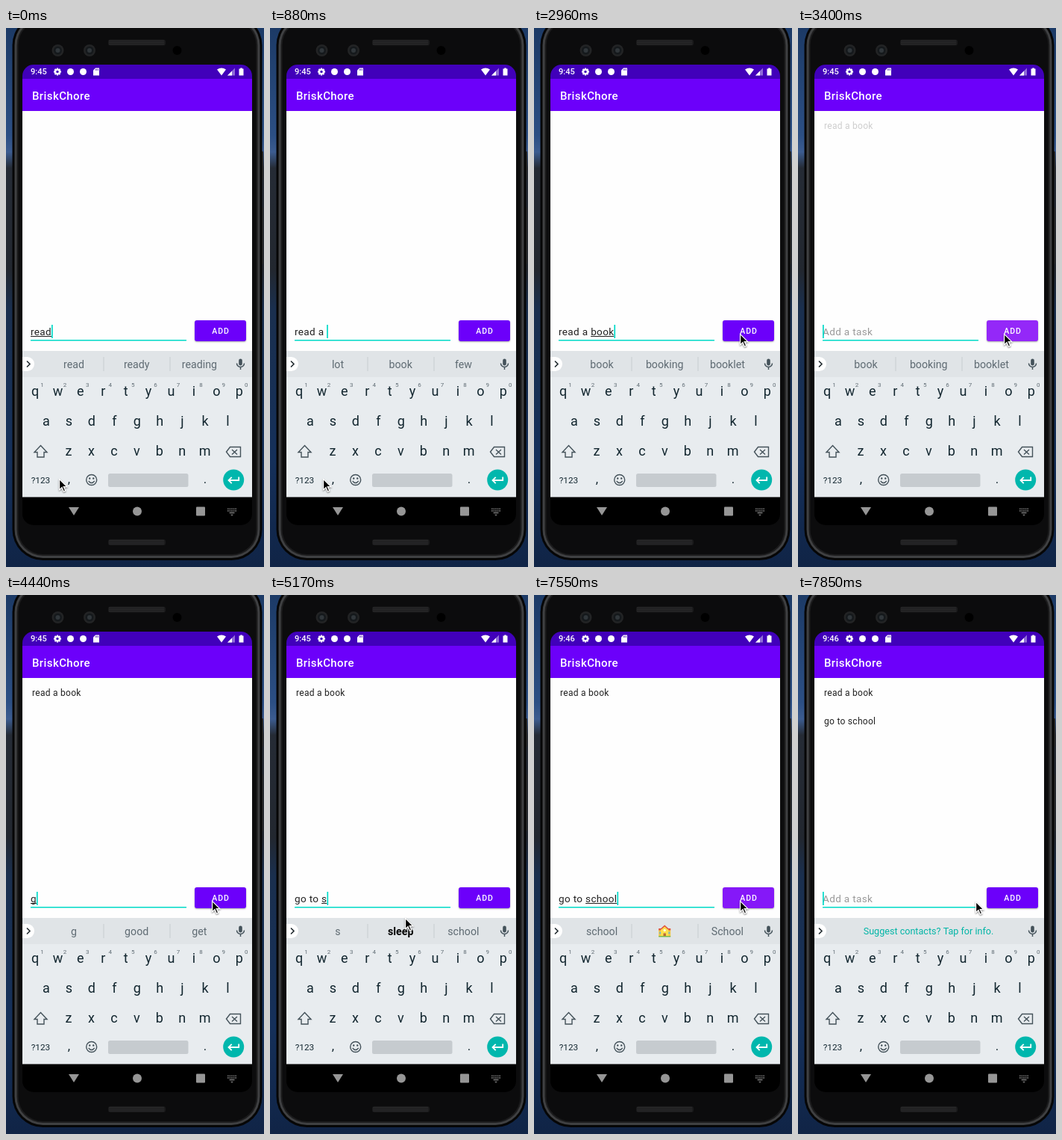
An HTML page with a canvas for the animation above (8000 ms loop, 346x721 px).

```html
<!DOCTYPE html>
<html lang="en">
<head>
<meta charset="utf-8">
<title>To-do list demo</title>
<style>
  html, body { margin: 0; width: 100%; height: 100%; overflow: hidden; background: #000; }
  canvas { display: block; }
</style>
</head>
<body>
<canvas id="stage" width="346" height="721"></canvas>
<script>
const ctx = document.getElementById('stage').getContext('2d');
const LOOP = 8000;
const TEAL = '#00dac8', INK = '#12262f', GREY = '#5f6b73', ICON = '#44525a';
const NOTICE = ['Suggest contacts? Tap for info.'];

// [time, text with | before the word being composed, suggestions]
const typing = [
  [0, '|read', ['read', 'ready', 'reading']],
  [440, 'read ', ['read', 'ready', 'reading']],
  [590, 'read ', ['the', 'a', 'it']],
  [740, 'read |a', ['a', 'as', 'and']],
  [880, 'read a ', ['lot', 'book', 'few']],
  [1180, 'read a |b', ['b', 'book', 'bit']],
  [1480, 'read a |bo', ['bo', 'book', 'box']],
  [1630, 'read a |book', ['book', 'books', 'booked']],
  [1780, 'read a |book', ['book', 'booking', 'booklet']],
  [3400, '', ['book', 'booking', 'booklet']],
  [3690, '', NOTICE],
  [4440, '|g', ['g', 'good', 'get']],
  [4590, '|go', ['go', 'good', 'going']],
  [4730, 'go |t', ['t', 'to', 'the']],
  [4880, 'go |to', ['to', 'too', 'today']],
  [5030, 'go to ', ['the', 'bed', 'sleep']],
  [5170, 'go to |s', ['s', '*sleep', 'school']],
  [5460, 'go to |sc', ['sc', '*school', 'score']],
  [5610, 'go to |sch', ['sch', '*school', 'schedule']],
  [6210, 'go to |scho', ['scho', '*school', 'schools']],
  [6360, 'go to |schoo', ['schoo', '*school', 'School']],
  [6650, 'go to |school', ['school', '#', 'School']],
  [7700, '', ['school', '#', 'School']],
  [7850, '', NOTICE]
];
const pointer = [
  [0, 71, 603], [2070, 143, 582], [2220, 207, 543], [2370, 246, 468], [2510, 270, 425],
  [2660, 276, 409], [5030, 230, 424], [5170, 181, 432], [6950, 238, 418],
  [7100, 276, 409], [7850, 238, 410]
];
const button = [
  [0, '#6c00fa'], [3250, '#8518f8'], [3400, '#9428f8'], [3550, '#7d12f9'],
  [3690, '#6c00fa'], [7550, '#8518f8'], [7700, '#9428f8'], [7850, '#6c00fa']
];
const caret = [[0, true], [2070, false], [2660, true], [7100, false], [7550, true]];
const tasks = [
  ['read a book', 135, [[0, 0], [3400, .22], [3550, 1]]],
  ['go to school', 173, [[0, 0], [7700, .22], [7850, 1]]]
];

const at = (steps, t) => steps.findLast(s => s[0] <= t);

function text(str, x, y, size, color, { weight = 400, align = 'center', spacing = 0 } = {}) {
  ctx.font = `${weight} ${size}px Roboto, sans-serif`;
  ctx.letterSpacing = spacing + 'px';
  ctx.textAlign = align;
  ctx.fillStyle = color;
  ctx.fillText(str, x, y);
  return ctx.measureText(str).width;
}
function rect(x, y, w, h, color, r = 0) {
  ctx.fillStyle = color;
  ctx.beginPath();
  ctx.roundRect(x, y, w, h, r);
  ctx.fill();
}
function disc(x, y, r, color) {
  ctx.fillStyle = color;
  ctx.beginPath();
  ctx.arc(x, y, r, 0, 7);
  ctx.fill();
}
function shape(d, x, y, fill, stroke, width = 1.4) {
  const path = new Path2D(d);
  ctx.save();
  ctx.translate(x, y);
  if (fill) { ctx.fillStyle = fill; ctx.fill(path); }
  if (stroke) { ctx.strokeStyle = stroke; ctx.lineWidth = width; ctx.stroke(path); }
  ctx.restore();
}

function drawPhone() {
  // Sky, dark cliffs, sea
  const desk = ctx.createLinearGradient(0, 0, 0, 721);
  [[0, '#1c3a66'], [.2, '#2c4f84'], [.23, '#3c5c90'], [.26, '#252b35'], [.45, '#22272f'],
   [.52, '#1a2f4e'], [.8, '#15305a'], [1, '#102446']].forEach(s => desk.addColorStop(...s));
  rect(0, 0, 346, 721, desk);
  rect(342, 165, 3, 38, '#2a2a2b', 1);
  rect(342, 240, 3, 76, '#2a2a2b', 1);
  // Nested outlines: rim, metal band, bezel
  [[0, '#060606'], [3, '#3f4042'], [6, '#1c1c1d'], [8, '#0c0c0d']].forEach(([inset, color]) =>
    rect(8.5 + inset, inset - 18, 335 - 2 * inset, 730 - 2 * inset, color, 41 - inset));
  for (const y of [15.5, 684]) {
    rect(137, y, 77, 8, '#1b1b1c', 3);
    for (let i = 0; i < 37; i++)
      for (let j = 0; j < 3; j++) rect(138.5 + i * 2, y + 1 + j * 2.3, 1, 1.2, '#3a3a3b');
  }
  for (const x of [69.5, 112]) {
    disc(x, 30, 8, '#232425');
    disc(x, 30, 5.5, '#15191c');
    disc(x, 30, 3, '#30363a');
  }
  disc(229.5, 30, 6, '#000');
}

function drawStatus(t) {
  rect(22, 49, 308, 20, '#4100ba', [15, 15, 0, 0]);
  text(t < 6950 ? '9:45' : '9:46', 33, 62, 11, '#fff', { weight: 500, align: 'left' });
  for (let i = 0; i < 4; i++) {
    ctx.save();
    ctx.translate(69, 58.5);
    ctx.rotate(i * Math.PI / 4);
    rect(-1.2, -5, 2.4, 10, '#fff', .5);
    ctx.restore();
  }
  disc(69, 58.5, 3.7, '#fff');
  disc(69, 58.5, 1.7, '#4100ba');
  disc(86.5, 58.5, 4.5, '#fff');
  disc(103.5, 58.5, 4.5, '#fff');
  shape('M-1-5H4V5H-4V-2Z', 121, 58.5, '#fff');
  for (const x of [-.8, .8, 2.4]) rect(120.6 + x, 54.7, .8, 2, '#4100ba');
  shape('M0 5L-6-3Q0-7 6-3Z', 289, 58.5, '#fff');
  shape('M-5 5L5-5V5Z', 302, 58.5, '#8f6bd8');
  shape('M-5 5L1-1V5Z', 302, 58.5, '#fff');
  shape('M-1.3-5H1.3V-4H3V5H-3V-4H-1.3Z', 315.5, 58.5, '#fff');
}

function drawApp(t) {
  rect(22, 68, 308, 43, '#6c00fa');
  text('BriskChore', 35, 96, 15, '#fff', { weight: 500, align: 'left', spacing: .4 });
  rect(22, 111, 308, 321, '#fefefe');
  for (const [name, y, fade] of tasks) {
    ctx.globalAlpha = at(fade, t)[1];
    text(name, 35, y, 12, '#202020', { align: 'left', spacing: .28 });
  }
  ctx.globalAlpha = 1;

  const style = { align: 'left', spacing: .36 };
  const [before, word = ''] = at(typing, t)[1].split('|');
  const start = 33 + text(before, 33, 411, 13.5, '#202020', style);
  const end = start + text(word, start, 411, 13.5, '#202020', style);
  if (word) rect(start, 412, end - start, 1, '#202020');
  if (!before && !word) text('Add a task', 33, 411, 13.5, '#999', style);
  rect(33, 417, 209, 1.5, TEAL);
  if (at(caret, t)[1]) rect(end, 397, 1.7, 18, TEAL);

  ctx.save();
  ctx.shadowColor = '#0005';
  ctx.shadowBlur = 2;
  ctx.shadowOffsetY = 1;
  rect(253, 391, 69, 28, at(button, t)[1], 3);
  ctx.restore();
  text('ADD', 288, 409, 10.5, '#fff', { weight: 500, spacing: .94 });
}

function drawSchool(x, y) {
  rect(x - 8, y - 3, 16, 10, '#f5c944');
  rect(x - 8, y - 4, 16, 2.5, '#e0523f');
  shape('M-5-3L0-8L5-3V7H-5Z', x, y, '#fbe04f');
  shape('M-5-3L0-7.5L5-3', x, y, null, '#e0523f', 1.6);
  disc(x, y - 1.5, 1.6, '#fff');
  rect(x - 1.7, y + 2.5, 3.4, 4.5, '#b9683a');
  for (const dx of [-7, 5.2]) rect(x + dx, y + .5, 1.8, 3, '#6fb7d8');
  rect(x - 8, y + 6, 16, 1.5, '#79b84a');
}

function drawSuggestions(t) {
  rect(22, 432, 308, 35, '#e0e4e7');
  rect(22, 440, 16, 19, '#fff', [0, 9.5, 9.5, 0]);
  shape('M-2-4L2 0L-2 4', 30, 449.5, null, '#20292e', 1.6);
  const words = at(typing, t)[2];
  if (words.length === 1) {
    text(words[0], 175, 454, 12.6, '#00b5a6');
  } else {
    for (const x of [131, 220]) rect(x - .5, 440, 1, 19, '#c6ccd0');
    words.forEach((word, i) => {
      const x = 91 + i * 84.2;
      if (word === '#') drawSchool(x, 450);
      else if (word[0] === '*') text(word.slice(1), x, 455, 14.2, '#000', { weight: 700 });
      else text(word, x, 455, 14.2, GREY);
    });
  }
  rect(312.2, 442.5, 4.6, 9, ICON, 2.3);
  shape('M-5-1A5 5 0 0 0 5-1M0 4V7.5', 314.5, 449.5, null, ICON, 1.5);
}

function drawKeyboard() {
  rect(22, 467, 308, 161, '#e8ecef');
  ['qwertyuiop', 'asdfghjkl', 'zxcvbnm'].forEach((row, r) => {
    [...row].forEach((key, i) => {
      const x = [39, 54, 84][r] + i * 30.42;
      text(key, x, 492.4 + r * 39.7, 18, INK);
      if (!r) text((i + 1) % 10, x + 9.5, 480, 8, GREY);
    });
  });
  shape('M0-8L8.5 1H4.5V7.5H-4.5V1H-8.5Z', 46.5, 566.5, null, ICON);
  shape('M-9.5 0L-4.5-6.5H9.5V6.5H-4.5ZM-2-3L5 3.5M5-3L-2 3.5', 305, 567, null, ICON);
  text('?123', 46.5, 609, 11.8, INK);
  text(',', 84.5, 609, 17, INK);
  text('.', 267, 609, 17, INK);
  shape('M7 0A7 7 0 1 1-7 0A7 7 0 1 1 7 0M-4 1.5Q0 6.5 4 1.5', 114.7, 604.5, null, ICON);
  for (const dx of [-2.5, 2.5]) disc(114.7 + dx, 602.5, 1.2, ICON);
  rect(137, 596, 107.5, 18, '#c6cbcf', 2.5);
  disc(305.2, 604.5, 14, '#00b7ad');
  shape('M7-4.5V0H-6.5M-2.5-4.2L-6.7 0L-2.5 4.2', 305.2, 605, null, '#fff', 1.8);

  rect(22, 627.5, 308, 37.5, '#000', [0, 0, 15, 15]);
  shape('M-7-5H7L0 6Z', 91, 646, '#969696');
  disc(176, 646.5, 6, '#969696');
  rect(255, 640.5, 12, 12, '#969696', 1);
  for (let i = 0; i < 5; i++)
    for (let j = 0; j < 2; j++) rect(297 + i * 2.6, 642.5 + j * 2.6, 1.6, 1.6, '#777');
  rect(299.6, 647.7, 6.9, 1.6, '#777');
  shape('M-2 0H2L0 2Z', 303, 650.7, '#777');
}

function drawPointer(t) {
  const [, x, y] = at(pointer, t);
  ctx.save();
  ctx.shadowColor = '#0006';
  ctx.shadowBlur = 2;
  ctx.shadowOffsetY = 1;
  shape('M.5.5V15L3.9 11.9L6.3 17.3L8.9 16.2L6.5 10.9H11Z', x, y, '#fff', '#fff', 1.2);
  ctx.restore();
  shape('M1.2 2V13.2L4.2 10.5L6.7 16.2L7.8 15.7L5.3 10H9.2Z', x, y, '#000');
}

function frame(now) {
  const t = now % LOOP;
  drawPhone();
  drawStatus(t);
  drawApp(t);
  drawSuggestions(t);
  drawKeyboard();
  drawPointer(t);
  requestAnimationFrame(frame);
}
requestAnimationFrame(frame);
</script>
</body>
</html>
```
